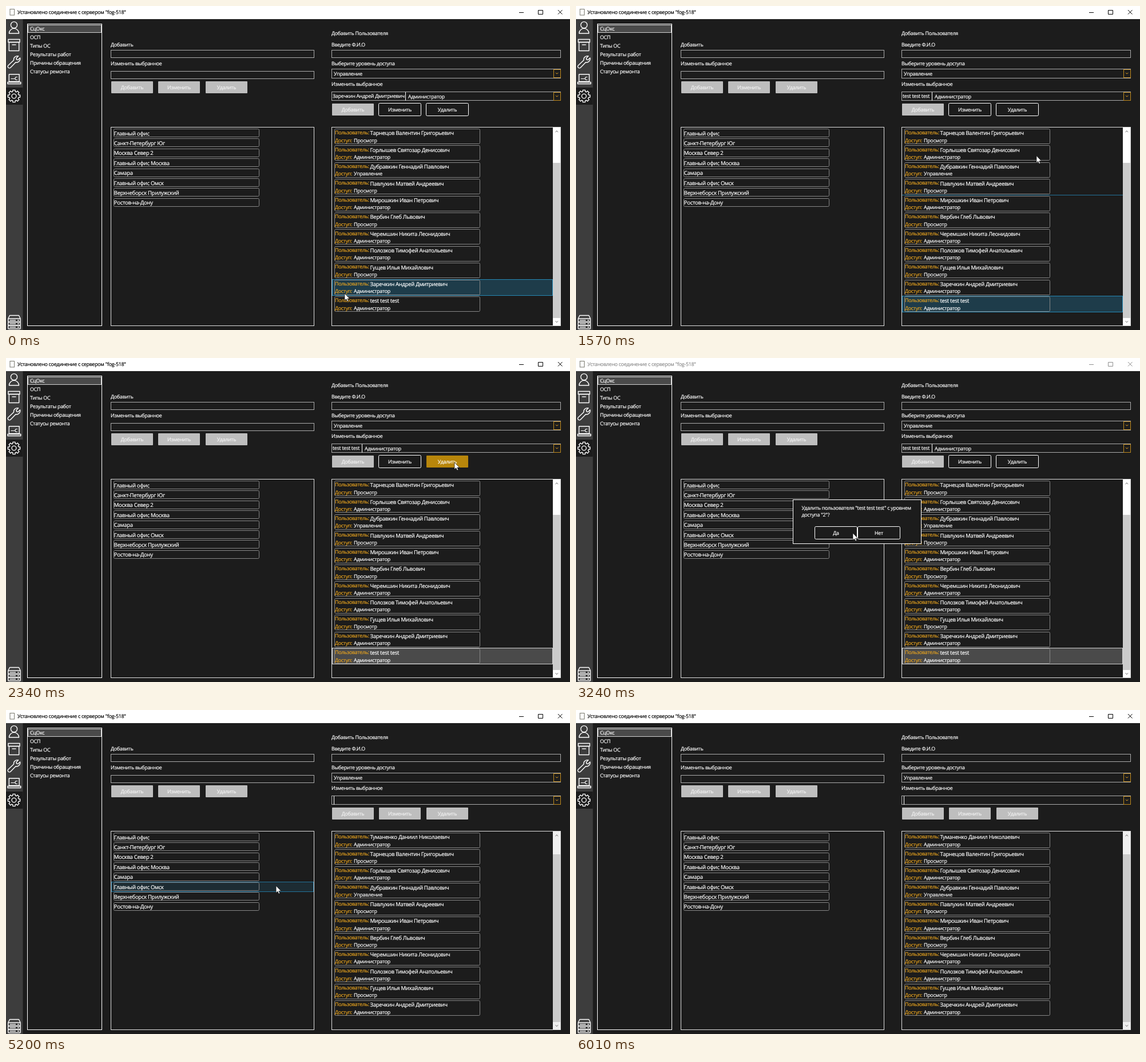
Write an HTML page that moves like this. It is 986x568 px and loops after 7.2 s.

```html
<!DOCTYPE html>
<html lang="ru">
<head>
<meta charset="utf-8">
<title>Справочники</title>
<style>
html, body { margin: 0; width: 100%; height: 100%; overflow: hidden; background: #1c1c1c; }
svg { display: block; position: absolute; left: 0; top: 0; color: #fff; }
text {
  font-family: "Open Sans", "Noto Sans", sans-serif;
  letter-spacing: -0.03em;
  fill: currentColor;
  stroke: currentColor;
  stroke-width: 0.2;
  text-rendering: geometricPrecision;
  white-space: pre;
}
.mid { text-anchor: middle; }
.line { fill: none; stroke: #fff; }
.list { fill: none; stroke: #dedede; }
.field { fill: none; stroke: #acacac; }
.item { fill: none; stroke: #868686; }
.gold { color: #e6a21f; }
.icon { fill: none; stroke: #fff; stroke-width: 1.4; stroke-linejoin: round; }
.btn .frame { fill: #1c1c1c; stroke: #fff; }
.btn.off .frame, .btn.hot .frame, .btn.on .face { display: none; }
.btn.off .face { fill: #bebebe; }
.btn.off text { color: #f3f3f3; }
.btn.hot .face { fill: #b8860b; }
.active { fill: #1e3c4a; stroke: #2587b4; }
.idle { fill: #4a4a4a; stroke: #d0d0d0; }
.hover { fill: #1d2c33; stroke: #23739a; }
</style>
</head>
<body>
<svg id="stage" width="986" height="568" viewBox="0 0 986 568"></svg>
<script>
const LOOP = 7200;
const SMALL = 8.85, LARGE = 9.5;
const ROW = 29.4, ROW_TOP = 214.5;
const CELL = 17.4;
const ADMIN = 'Администратор', VIEW = 'Просмотр', MANAGE = 'Управление';

const sections = ['СцОкс', 'ОСП', 'Типы ОС', 'Результаты работ', 'Причины обращения', 'Статусы ремонта'];
const offices = ['Главный офис', 'Санкт-Петербург Юг', 'Москва Север 2', 'Главный офис Москва',
  'Самара', 'Главный офис Омск', 'Верхнеборск Прилужский', 'Ростов-на-Дону'];
const users = [
  ['Туманенко Даниил Николаевич', ADMIN],
  ['Тарнецов Валентин Григорьевич', VIEW],
  ['Горлышев Святозар Денисович', ADMIN],
  ['Дубравкин Геннадий Павлович', MANAGE],
  ['Павлухин Матвей Андреевич', VIEW],
  ['Мирошкин Иван Петрович', ADMIN],
  ['Вербин Глеб Львович', VIEW],
  ['Черемшин Никита Леонидович', ADMIN],
  ['Полозков Тимофей Анатольевич', ADMIN],
  ['Гущев Илья Михайлович', VIEW],
  ['Заречкин Андрей Дмитриевич', ADMIN],
  ['test test test', ADMIN]
];

// y is the visual middle of the line
const text = (x, y, s, size = SMALL, cls = '', id = '') =>
  `<text x="${x}" y="${(y + size * 0.36).toFixed(2)}" font-size="${size}" class="${cls}" id="${id}">${s}</text>`;
const rect = (x, y, r, b, cls, more = '') =>
  `<rect x="${x}" y="${y}" width="${r - x}" height="${b - y}" class="${cls}" ${more}/>`;
const path = (d, cls, more = '') => `<path d="${d}" class="${cls}" ${more}/>`;
// the outline of an enabled button lies just outside its face
const button = (id, x, y, label, cls) =>
  `<g id="${id}" class="btn ${cls}">${rect(x, y, x + 73, y + 21, 'face', 'rx="1"')}
  ${rect(x - 0.5, y - 0.5, x + 73.5, y + 21.5, 'frame', 'rx="2"')}
  ${text(x + 36.5, y + 11, label, SMALL, 'mid')}</g>`;
const chevron = (x, y, dir, color) =>
  path(`M${x - 2.2} ${y - dir}L${x} ${y + dir}L${x + 2.2} ${y - dir}`, '', `fill="none" stroke="${color}"`);
const dropArrow = y => rect(957.5, y - 7, 969.5, y + 7, '', 'fill="#1c1c1c" stroke="#c08a1e"') +
  chevron(963.2, y - 0.5, 1.1, '#e6a21f');

function gear(cx, cy) {
  const pts = [];
  for (let i = 0; i < 8; i++) {
    [[-0.27, 8.3], [-0.19, 10.8], [0.19, 10.8], [0.27, 8.3]].forEach(([da, r]) => {
      const a = i * Math.PI / 4 + da;
      pts.push((cx + r * Math.cos(a)).toFixed(1) + ' ' + (cy + r * Math.sin(a)).toFixed(1));
    });
  }
  return path('M' + pts.join('L') + 'Z', 'icon') + `<circle cx="${cx}" cy="${cy}" r="3.9" class="icon"/>`;
}

function sidebar() {
  const shelf = y => rect(3.8, y, 25.2, y + 6, 'icon', 'rx="1"') +
    path(`M6.5 ${y + 3}H17M20 ${y + 3}H23`, 'icon');
  return rect(0, 23, 29.5, 568, '', 'fill="#3d3d3d"') +
    rect(0, 143, 29.5, 173, '', 'fill="#1c1c1c"') +
    '<circle cx="14" cy="33.2" r="5.6" class="icon"/>' +
    path('M5.4 48a8.6 8.6 0 0 1 17.2 0z', 'icon') +
    rect(4, 58.5, 24, 63.5, 'icon') + rect(5.3, 63.5, 22.7, 78.5, 'icon') + path('M10.5 68H17.5', 'icon') +
    path('M4 104L13.5 95A6.5 6.5 0 0 1 21.5 87.8L18 91.5L18.5 94L21 94.5L24.6 91A6.5 6.5 0 0 1 17 98.8L8 108A2.8 2.8 0 0 1 4 104Z', 'icon') +
    rect(5.3, 119.8, 23.2, 132.5, 'icon') + path('M3 133.5H25.8V136.5H3Z', 'icon') +
    path('M8.5 127.5H16M20 124.5h-2.5l-1.5 1.5v2l1.5 1.5H20', 'icon', 'style="stroke-width:1.1"') +
    gear(14, 158) +
    path('M3.8 548L6.5 542.5H22.5L25.2 548', 'icon') + shelf(548) + shelf(554) + shelf(560);
}

const caption = () => rect(0, 0, 986, 23, '', 'fill="#fff"') +
  rect(7, 5.5, 14.5, 16, '', 'fill="#fff" stroke="#77776c"') +
  `<g id="caption">${text(20, 10.8, 'Установлено соединение с сервером "fog-518"')}
  ${path('M897 11.5H905M930.5 7.5H938.5V14.5H930.5ZM965 7L972.5 14.5M972.5 7L965 14.5', '', 'fill="none" stroke="currentColor"')}</g>`;

const middle = () => text(183, 68, 'Добавить') + rect(183.5, 77.5, 538.5, 90.5, 'field') +
  text(183, 101, 'Изменить выбранное') + rect(183.5, 114.5, 538.5, 127.5, 'field') +
  ['Добавить', 'Изменить', 'Удалить'].map((s, i) => button('m' + i, [184, 266, 349][i], 132, s, 'off')).join('') +
  rect(183.5, 212.5, 538.5, 560.5, 'list') +
  rect(184.5, 0, 537.5, 17, 'hover', 'id="cellHover"') +
  offices.map((s, i) => rect(188.5, Math.round(215 + i * CELL) + 0.5, 442.5, Math.round(229 + i * CELL) + 0.5, 'item', 'rx="2"') +
    text(188.8, 223.2 + i * CELL, s, LARGE)).join('');

function userRows(from, to) {
  return users.slice(from, to).map(([name, access], i) => {
    const y = i * ROW, top = Math.round(215 + y) + 0.5;
    return rect(574.5, top, 828.5, top + 26, 'item', 'rx="2"') +
      text(575, 222 + y, 'Пользователь:', SMALL, 'gold') + text(636.5, 223 + y, name, LARGE) +
      text(575, 235.5 + y, 'Доступ:', SMALL, 'gold') + text(608, 235.5 + y, access);
  }).join('');
}

const right = () => text(569, 48, 'Добавить Пользователя') + text(569, 68, 'Введите Ф.И.О') +
  rect(569.5, 77.5, 969.5, 90.5, 'field') + text(569, 101, 'Выберите уровень доступа') +
  rect(569.5, 110.5, 969.5, 126.5, 'field') + text(573, 119, MANAGE) + dropArrow(118.5) +
  text(569, 137, 'Изменить выбранное') + rect(569.5, 150.5, 969.5, 165.5, 'field') + dropArrow(158.5) +
  text(571, 157.5, '', SMALL, '', 'editName') + text(0, 159, ADMIN, SMALL, '', 'editAccess') +
  path('M0 151V166', 'line', 'id="split"') +
  button('add', 570, 171, 'Добавить', 'off') + button('edit', 652, 171, 'Изменить', 'on') +
  button('del', 735, 171, 'Удалить', 'on') +
  rect(569.5, 212.5, 969.5, 560.5, 'list') +
  rect(570.5, 0, 955.5, 28, 'hover', 'id="rowHover"') +
  path('M570 331.5H956', '', 'id="trail" stroke="#23739a"') +
  rect(570.5, 0, 955.5, 28, 'active', 'id="sel"') +
  `<g id="before">${userRows(1, 12)}</g><g id="after">${userRows(0, 11)}</g>` +
  rect(956, 213, 969, 560, '', 'id="track"') + rect(956, 0, 969, 0, '', 'id="thumb" fill="#cbcbcb"') +
  chevron(962.8, 220, -1.3, '#707070') + chevron(962.8, 553.5, 1.3, '#707070');

const dialog = () => `<g id="dialog">${rect(379.5, 248.5, 603.5, 325.5, '', 'fill="#1c1c1c" stroke="#fff"')}
  ${text(394.5, 263.3, 'Удалить пользователя "test test test" с уровнем')}${text(394.5, 275.3, 'доступа "2"?')}
  ${button('yes', 418, 296, 'Да', 'on')}${button('no', 493, 296, 'Нет', 'on')}</g>`;

document.getElementById('stage').innerHTML =
  rect(0, 0, 986, 568, '', 'fill="#1c1c1c"') + caption() + sidebar() +
  rect(37.5, 31.5, 167.5, 560.5, 'line') + rect(38.5, 33.5, 166.5, 46.5, 'idle') +
  sections.map((s, i) => text(42, 40.3 + i * 15, s)).join('') +
  middle() + right() + dialog() +
  path('M0 0V12.3L2.8 9.7 4.7 14 6.7 13.1 4.8 9.1H8.7Z', '', 'id="cursor" fill="#fff" stroke="#000" stroke-width=".6"');

const $ = id => document.getElementById(id);
const show = (id, yes) => { $(id).style.display = yes ? '' : 'none'; };
const set = (id, key, value) => $(id).setAttribute(key, value);
const within = (v, a, b) => v >= a && v < b;
const clamp = v => Math.max(0, Math.min(1, v));
const snap = (i, pitch) => Math.round(ROW_TOP - 0.5 + i * pitch) + 0.5;

// time, x, y of the pointer tip
const track = [
  [0, 592, 504], [340, 592, 504], [560, 640, 519], [720, 682, 534], [830, 676, 526],
  [1380, 676, 526], [1470, 735, 420], [1570, 805, 263], [1700, 811, 216], [1880, 791, 187], [2090, 784, 183],
  [2790, 784, 183], [2900, 735, 212], [3020, 630, 268], [3140, 520, 304], [3240, 484, 307], [3490, 472, 308],
  [5200, 472, 308], [5310, 488, 325], [5420, 547, 395], [5510, 605, 460], [5700, 775, 525], [5920, 944, 562],
  [6010, 950, 568]
];

function pointer(t) {
  const i = track.findIndex(p => p[0] > t);
  if (i < 0) return track[track.length - 1].slice(1);
  const [a, b] = [track[i - 1], track[i]];
  const k = (t - a[0]) / (b[0] - a[0]);
  return [a[1] + (b[1] - a[1]) * k, a[2] + (b[2] - a[2]) * k];
}

const style = (enabled, hot) => 'btn ' + (hot ? 'hot' : enabled ? 'on' : 'off');

function render(t) {
  const [x, y] = pointer(t);
  const [hx, hy] = pointer(Math.max(0, t - 90));
  const modal = within(t, 2430, 4450);
  const removed = t >= 4480;
  const picked = t >= 1010 ? 10 : 9;

  show('cursor', t < 6010);
  set('cursor', 'transform', `translate(${x.toFixed(1)} ${y.toFixed(1)})`);
  $('caption').style.color = modal ? '#8f8f8f' : '#000';

  show('before', !removed);
  show('after', removed);
  show('sel', !removed);
  set('sel', 'y', snap(picked, ROW));
  set('sel', 'class', t < 2340 ? 'active' : 'idle');
  const thumbTop = removed ? 253 : 275;
  set('track', 'fill', removed ? '#f0f0f0' : '#fff');
  set('thumb', 'y', thumbTop);
  set('thumb', 'height', 547 - thumbTop);

  const split = removed ? 573.5 : picked === 10 ? 622.5 : 698.5;
  $('editName').textContent = removed ? '' : users[picked + 1][0];
  set('editAccess', 'x', split + 4.5);
  show('editAccess', !removed);
  set('split', 'transform', `translate(${split} 0)`);

  set('edit', 'class', style(!removed, false));
  set('del', 'class', style(!removed, t < 2430 && within(x, 735, 809) && within(y, 171, 192)));

  const trailing = within(t, 1540, 1630);
  const row = Math.floor((hy - ROW_TOP) / ROW);
  const overRows = !modal && t < 6010 && !trailing && within(hx, 570, 956) && within(row, 0, 11) &&
    (removed || row !== picked);
  show('rowHover', overRows);
  set('rowHover', 'y', snap(row, ROW));
  show('trail', trailing);
  const cell = Math.floor((hy - ROW_TOP) / CELL);
  show('cellHover', removed && within(hx, 184, 538) && within(cell, 0, offices.length));
  set('cellHover', 'y', snap(cell, CELL));

  const open = clamp((t - 2430) / 150) * clamp((4480 - t) / 60);
  const scale = 0.9 + 0.1 * open;
  show('dialog', open > 0);
  set('dialog', 'opacity', open);
  set('dialog', 'transform', `translate(492 287) scale(${scale}) translate(-492 -287)`);
  set('yes', 'class', style(true, t >= 3270));
  set('no', 'class', style(true, within(t, 3150, 3220)));
}

const start = performance.now();
function tick() {
  render((performance.now() - start) % LOOP);
  requestAnimationFrame(tick);
}
tick();
</script>
</body>
</html>
```
